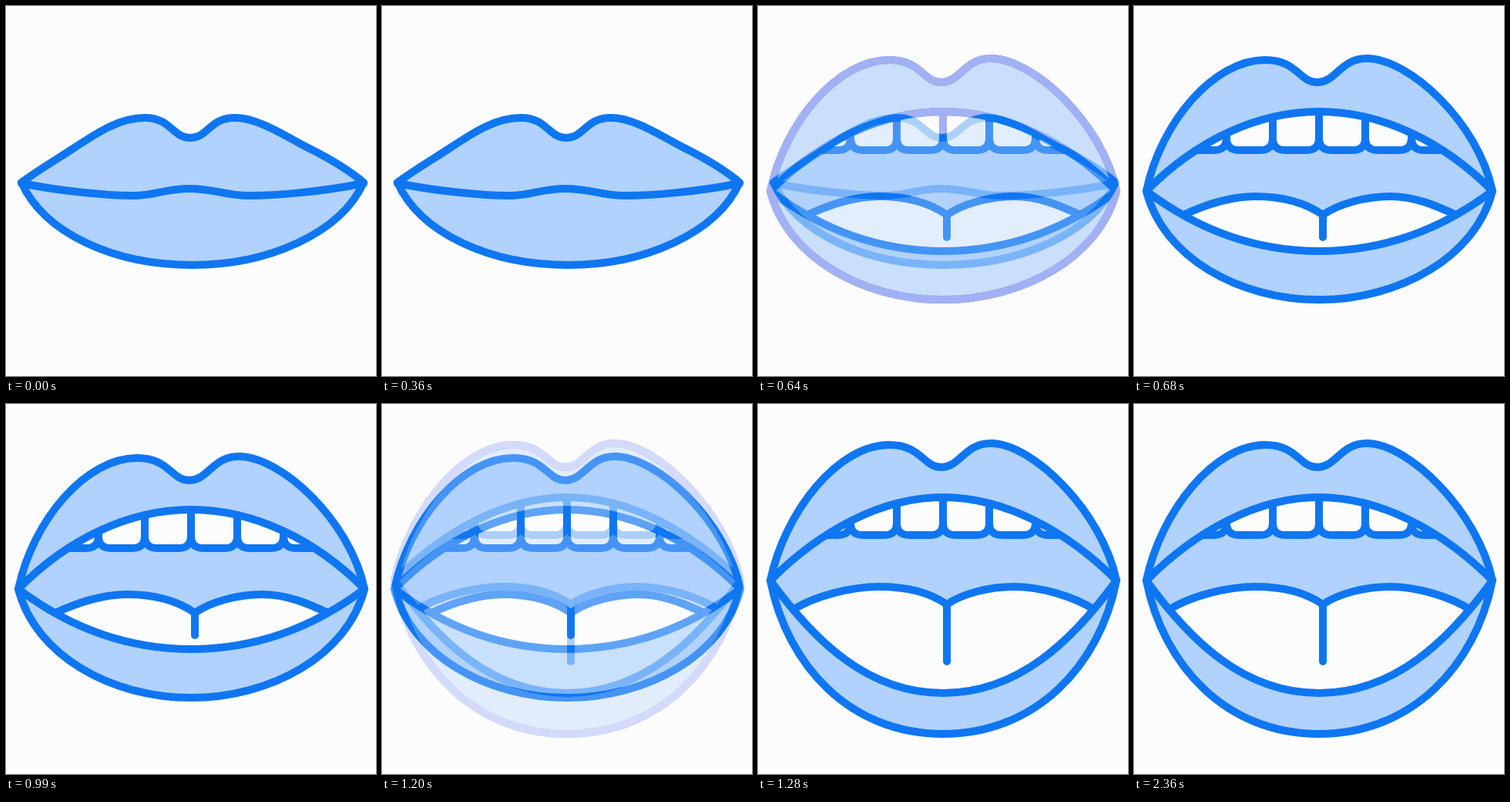
These frames come from a looping animation (480x480 px, 3080 ms). An HTML page:

```html
<!DOCTYPE html>
<html lang="en">
<head>
<meta charset="utf-8">
<title>Speaking lips</title>
<style>
  html, body { margin: 0; width: 100%; height: 100%; overflow: hidden; background: #fcfcfc; }
  svg { display: block; width: 100vw; height: 100vh; }
</style>
</head>
<body>
<svg id="stage" viewBox="0 0 480 480"></svg>
<script>
const PAPER = '#fcfcfc', SKIN = '#b0d2fc', INK = '#0f76f2';
const LOOP = 3080, STEP = 40, FADES = [600, 1200];
const HAZE = ['#d4dafa', '#a2b0f4']; // ink of a fading-in pose over bare paper

const closedLips = {
  outline: `M20 229C40 214 72 195 90 183C116 166 146 145 180 145
    C214 145 216 171 239 171C262 171 264 145 297 145
    C328 145 364 170 392 184C420 198 444 212 464 229
    C434 295 340 336 242 336C140 336 50 295 20 229Z`,
  join: 'round',
  seam: `M20 230C70 240 130 246 165 246C195 246 205 237 238 237
    C270 237 285 246 314 246C350 246 410 241 464 230`
};

// chin and floor: [lowest y, x and y of the side handle, x of the bottom handle]
function openLips({ corner, lift, chin, floor, roof, teeth, tongue, uvula }) {
  const bowl = ([y, sideX, sideY, baseX]) =>
    `C${481 - sideX} ${sideY} ${480 - baseX} ${y} 240 ${y}C${baseX} ${y} ${sideX} ${sideY} 16 ${corner}Z`;
  const [tipX, tipY, crest, root] = tongue;
  const endX = 482 - tipX;
  const rise = corner - 90, arch = roof + 38 + lift / 3;
  return {
    join: 'miter',
    outline: `M16 ${corner}C35 ${rise} 104 ${70 - lift} 170 ${70 - lift}
      C212 ${70 - lift} 214 ${99 - lift} 238 ${99 - lift}
      C262 ${99 - lift} 268 ${68 - lift} 302 ${68 - lift}
      C356 ${68 - lift} 446 ${rise} 465 ${corner}` + bowl(chin),
    mouth: `M16 ${corner}C80 ${arch} 160 ${roof} 240 ${roof}
      C320 ${roof} 401 ${arch} 465 ${corner}` + bowl(floor),
    teeth: [60, 120, 180, 240, 300, 360].map(x =>
      `M${x} 90V${teeth - 16}Q${x} ${teeth} ${x + 16} ${teeth}H${x + 44}Q${x + 60} ${teeth} ${x + 60} ${teeth - 16}V90`
    ).join(''),
    tongue: `M${tipX} ${tipY}C${tipX + 28} ${crest + 12} 122 ${crest} 157 ${crest}
      C195 ${crest} 225 ${root - 14} 245 ${root}
      C265 ${root - 14} 300 ${crest} 332 ${crest}
      C365 ${crest} ${endX - 28} ${crest + 12} ${endX} ${tipY}`,
    uvula: `M245 ${root}V${uvula}`
  };
}

const poses = [
  closedLips,
  openLips({ corner: 240, lift: 0, chin: [381, 38, 326, 136], floor: [318, 85, 292, 160],
    roof: 137, teeth: 187, tongue: [62, 272, 247, 271], uvula: 300 }),
  openLips({ corner: 229, lift: 17, chin: [428, 38, 340, 120], floor: [375, 73, 307, 142],
    roof: 121, teeth: 170, tongue: [44, 268, 237, 260], uvula: 334 })
];

const path = (d, attrs = '') => `<path d="${d}" ${attrs}/>`;

function define(pose, i) {
  const clip = `clip-path="url(#mouth${i})"`;
  const open = pose.mouth;
  const fills = path(pose.outline, `fill="${SKIN}"`) + (open
    ? `<g fill="${PAPER}" ${clip}>${path(pose.teeth)}${path(pose.tongue + 'V400H44Z')}</g>` : '');
  const lines = path(pose.outline, `stroke-linejoin="${pose.join}"`) + (open
    ? path(pose.mouth) + `<g ${clip}>${path(pose.teeth)}${path(pose.tongue)}</g>` + path(pose.uvula)
    : path(pose.seam));
  return `${open ? `<clipPath id="mouth${i}">${path(pose.mouth)}</clipPath>` : ''}
    <g id="fills${i}">${fills}</g>
    <g id="lines${i}" fill="none" stroke-width="10" stroke-linecap="round" stroke-linejoin="round">${lines}</g>
    <mask id="outside${i}" maskUnits="userSpaceOnUse" x="0" y="0" width="480" height="480">
      <rect width="480" height="480" fill="#fff"/>
      ${path(pose.outline, `stroke="#000" stroke-width="10" stroke-linejoin="${pose.join}"`)}
    </mask>`;
}

const draw = i => `<rect width="480" height="480" fill="${PAPER}"/>
  <use href="#fills${i}"/><use href="#lines${i}" stroke="${INK}"/>`;

const stage = document.getElementById('stage');
stage.innerHTML = `<defs>${poses.map(define).join('')}</defs><g id="scene"></g>`;
const scene = document.getElementById('scene');

function render(time) {
  const t = time % LOOP;
  const next = FADES.filter(start => t >= start).length;
  const step = next ? Math.min(Math.floor((t - FADES[next - 1]) / STEP), 2) : 2;
  const key = next + ':' + step;
  if (key === scene.dataset.key) return;
  scene.dataset.key = key;
  scene.innerHTML = step === 2 ? draw(next) : `${draw(next - 1)}
    <g opacity="${(step + 1) / 3}">${draw(next)}</g>
    <g mask="url(#outside${next - 1})"><use href="#lines${next}" stroke="${HAZE[step]}"/></g>`;
}

const start = performance.now();
function tick() {
  render(performance.now() - start);
  requestAnimationFrame(tick);
}
tick();
</script>
</body>
</html>
```
